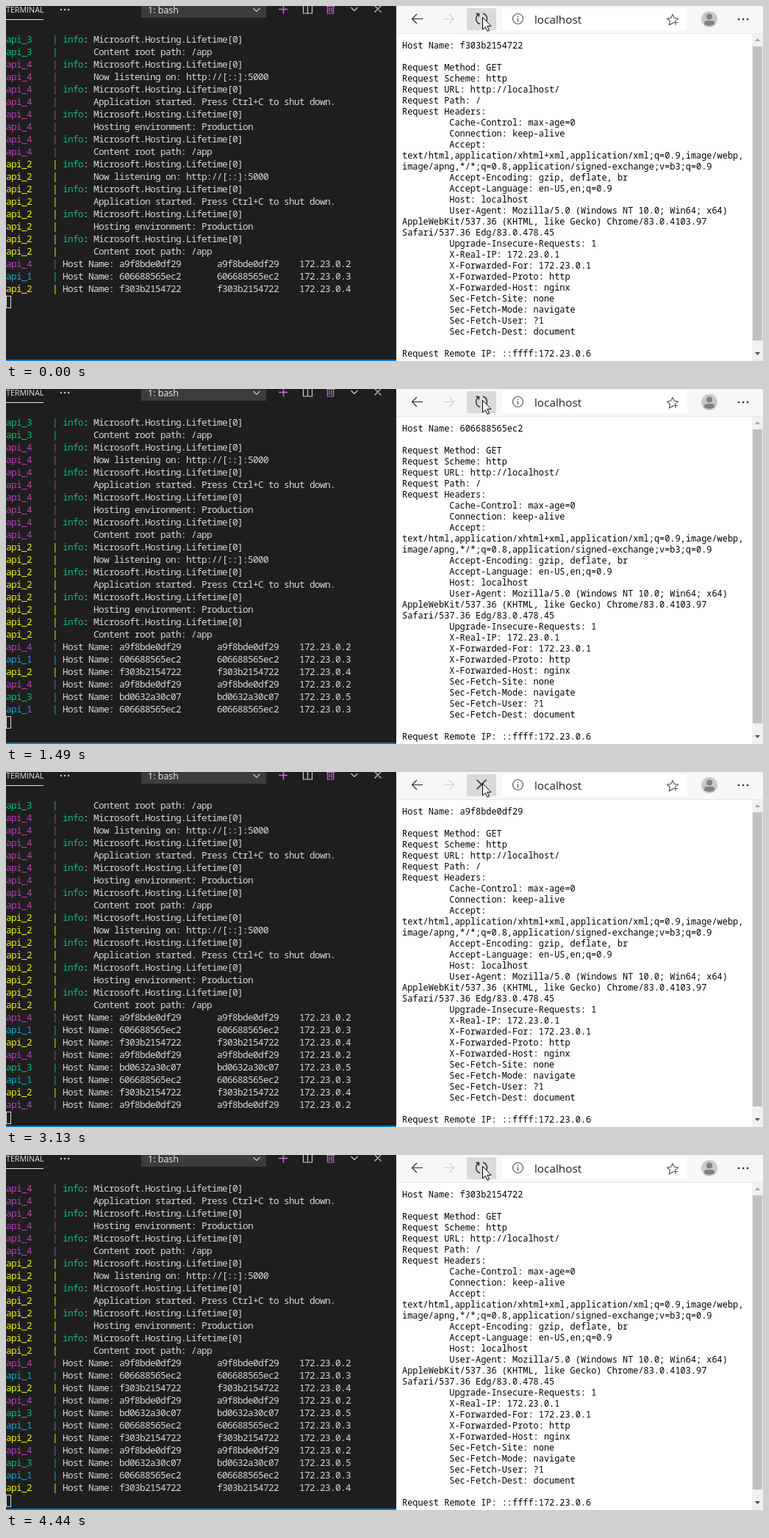
An HTML page for the animation above (4980 ms loop, 1030 by 484 pixels).

```html
<!DOCTYPE html>
<html lang="en">
<head>
<meta charset="utf-8">
<title>Load balanced requests</title>
<style>
  html, body { margin: 0; width: 100%; height: 100%; overflow: hidden; background: #1e1e1e; }
  svg { display: block; width: 1030px; height: 484px; }
  text { white-space: pre; }
  .mono { font-family: "Noto Sans Mono", "DejaVu Sans Mono", monospace; }
  .ui { font-family: "Open Sans", "Noto Sans", sans-serif; }
  .line { fill: none; stroke-width: 1.2; }
  /* terminal glyphs sit on a 7px cell grid */
  #log { font-size: 12.8px; letter-spacing: calc(7px - .6em); fill: #d8d8d8; }
  #page { font-size: 11.917px; fill: #000; }
</style>
</head>
<body>
<svg viewBox="0 0 1030 484">
  <!-- terminal -->
  <rect width="531" height="484" fill="#1e1e1e"/>
  <g id="log" class="mono"></g>
  <rect id="caret" x=".5" y="0" width="6" height="16" fill="none" stroke="#d8d8d8"/>
  <rect width="531" height="37" fill="#1e1e1e"/>
  <rect y="482" width="531" height="2" fill="#007acc"/>
  <text class="ui" x="0" y="9" font-size="10.7" fill="#e7e7e7">TERMINAL</text>
  <rect y="18" width="51" height="1" fill="#e7e7e7"/>
  <g fill="#d0d0d0">
    <circle cx="75" cy="5" r="1.2"/><circle cx="80" cy="5" r="1.2"/><circle cx="85" cy="5" r="1.2"/>
  </g>
  <rect x="184" width="170" height="16" fill="#3c3c3c"/>
  <text class="ui" x="193" y="10" font-size="12.5" fill="#f0f0f0">1: bash</text>
  <g class="line" stroke="#d0d0d0">
    <path d="M336.500 3l4.500 4.500l4.500-4.500M469.500 2l4.500 4.500l4.500-4.500M501.500-.5l9 9m0-9l-9 9"/>
    <path d="M404.500-2v12h12v-12M410.500-2v12"/>
  </g>
  <g class="line" stroke="#cf68e1">
    <path d="M371 4.500h12M377.500-2v12.500" stroke-width="1.500"/>
    <path d="M436 .5h11M437.500 1v9h8v-9M440 2v6M443 2v6"/>
  </g>

  <!-- browser -->
  <rect x="531" width="499" height="484" fill="#fff"/>
  <rect x="531" width="499" height="38" fill="#f7f7f7"/>
  <rect x="531" y="37" width="499" height="1" fill="#e6e6e6"/>
  <rect x="627" y="3" width="40" height="30" rx="2" fill="#dadada"/>
  <rect x="675" y="3" width="252" height="30" rx="3" fill="#fff"/>
  <g class="line" stroke="#2b2b2b">
    <path d="M567 17.500h-14.500m6.500-6.500l-6.500 6.500l6.500 6.500"/>
    <path d="M595 17.500h14.500m-6.500-6.500l6.500 6.500l-6.500 6.500" stroke="#d0d0d0"/>
    <g id="reload" stroke-width="1.400">
      <path d="M645 24.500A7.300 7.300 0 0 1 643 11.300M639.500 10.500h4v4"/>
      <path d="M649 10.200A7.300 7.300 0 0 1 651 23.500M654.500 24.500h-4v-4"/>
    </g>
    <path id="stop" d="M640.500 10.500l13 13m0-13l-13 13" stroke-width="1.500"/>
    <g stroke="#5a5a5a">
      <circle cx="696.500" cy="17.500" r="7"/>
      <path d="M696.500 16.500v5M696.500 13.500v1.500" stroke-width="1.400"/>
      <path d="M908 24l-1-.6l-4.600 2.400l.9-5.100l-3.700-3.600l5.100-.8l2.300-4.700l2.300 4.700l5.100.8l-2 2M911 19v7M907.500 22.500h7"/>
    </g>
  </g>
  <text class="ui" x="719" y="24" font-size="15.300" fill="#1f1f1f">localhost</text>
  <circle cx="957" cy="18" r="11" fill="#cbc9c8"/>
  <g fill="#85817f">
    <circle cx="957" cy="14.500" r="4"/>
    <path d="M950 25v-1.500q0-3.500 3.500-3.500h7q3.500 0 3.500 3.500v1.500q-7 4-14 0z"/>
  </g>
  <g fill="#2b2b2b">
    <circle cx="997" cy="18" r="1.300"/><circle cx="1003" cy="18" r="1.300"/><circle cx="1009" cy="18" r="1.300"/>
  </g>
  <g id="page" class="mono"></g>
  <rect x="1015" y="38" width="15" height="446" fill="#f1f1f1"/>
  <rect x="1016" y="55" width="13" height="401" fill="#c1c1c1"/>
  <path d="M1019 48l3.500-4l3.500 4z" fill="#a3a3a3"/>
  <path d="M1019 472l3.500 4l3.500-4z" fill="#505050"/>
  <path d="M648.500 15.500v16.500l3.800-3.600l2.700 6l2.500-1.100l-2.700-5.900h5.200z" fill="#fff" stroke="#000"/>
</svg>
<script>
const LOOP = 4980, ROW = 17, LAST_ROW = 25, FIRST_HITS = 3;

const hosts = {
  1: { id: "606688565ec2", ip: "172.23.0.3", color: "#11a8cd" },
  2: { id: "f303b2154722", ip: "172.23.0.4", color: "#f0f010" },
  3: { id: "bd0632a30c07", ip: "172.23.0.5", color: "#0dbc79" },
  4: { id: "a9f8bde0df29", ip: "172.23.0.2", color: "#bc3fbc" }
};

// late: the newline reaches the terminal only when the page loads
const hits = [
  { host: 4, click: 100, log: 200, load: 260 },
  { host: 3, click: 790, log: 890, load: 950 },
  { host: 1, click: 1390, log: 1490, load: 1490 },
  { host: 2, click: 1960, log: 2060, load: 2120 },
  { host: 4, click: 2500, log: 2600, load: 2660, late: true },
  { host: 3, click: 3130, log: 3290, load: 3360 },
  { host: 1, click: 3840, log: 3900, load: 3900 },
  { host: 2, click: 4280, log: 4380, load: 4440, late: true }
];

const messages = ["Now listening on: http://[::]:5000",
  "Application started. Press Ctrl+C to shut down.",
  "Hosting environment: Production", "Content root path: /app"];

const tab = " ".repeat(9);
const pageLines = ["Host Name: ", "", "Request Method: GET", "Request Scheme: http",
  "Request URL: http://localhost/", "Request Path: /", "Request Headers:",
  tab + "Cache-Control: max-age=0", tab + "Connection: keep-alive", tab + "Accept:",
  "text/html,application/xhtml+xml,application/xml;q=0.9,image/webp,",
  "image/apng,*/*;q=0.8,application/signed-exchange;v=b3;q=0.9",
  tab + "Accept-Encoding: gzip, deflate, br", tab + "Accept-Language: en-US,en;q=0.9",
  tab + "Host: localhost", tab + "User-Agent: Mozilla/5.0 (Windows NT 10.0; Win64; x64)",
  "AppleWebKit/537.36 (KHTML, like Gecko) Chrome/83.0.4103.97",
  "Safari/537.36 Edg/83.0.478.45", tab + "Upgrade-Insecure-Requests: 1",
  tab + "X-Real-IP: 172.23.0.1", tab + "X-Forwarded-For: 172.23.0.1",
  tab + "X-Forwarded-Proto: http", tab + "X-Forwarded-Host: nginx",
  tab + "Sec-Fetch-Site: none", tab + "Sec-Fetch-Mode: navigate",
  tab + "Sec-Fetch-User: ?1", tab + "Sec-Fetch-Dest: document", "",
  "Request Remote IP: ::ffff:172.23.0.6"];

const $ = id => document.getElementById(id);
const log = $("log"), page = $("page"), caret = $("caret");

function add(parent, name, attrs, content = "") {
  const node = document.createElementNS("http://www.w3.org/2000/svg", name);
  for (const key in attrs) node.setAttribute(key, attrs[key]);
  node.textContent = content;
  return parent.appendChild(node);
}

const logLines = [];
function addLog(host, body, level = "") {
  const line = add(log, "text", { x: 0, y: 50 + ROW * logLines.length });
  add(line, "tspan", { fill: hosts[host].color }, `api_${host}    | `);
  if (level) add(line, "tspan", { fill: "#0dbc79" }, level);
  add(line, "tspan", {}, body);
  logLines.push(line);
}

function addStartup(host, list) {
  for (const message of list) {
    addLog(host, ": Microsoft.Hosting.Lifetime[0]", "info");
    addLog(host, " ".repeat(6) + message);
  }
}

addStartup(3, messages.slice(3));
addStartup(4, messages);
addStartup(2, messages);
const startup = logLines.length;
for (const host of [4, 1, 2, ...hits.map(hit => hit.host)]) {
  const { id, ip } = hosts[host];
  addLog(host, `Host Name: ${id}       ${id}    ${ip}`);
}

const pageText = pageLines.map((line, i) => add(page, "text", { x: 539, y: 58 + 15 * i }, line));

const show = (node, on) => node.setAttribute("visibility", on ? "visible" : "hidden");

function draw(t) {
  let count = startup + FIRST_HITS, current = 2, loading = false, held = 0;
  for (const hit of hits) {
    if (t >= hit.log) count++;
    if (t >= hit.load) current = hit.host;
    if (t >= hit.click && t < hit.log) loading = true;
    if (hit.late && t >= hit.log && t < hit.load) held = 1;
  }
  const caretLine = count - held;
  const top = Math.max(0, caretLine - LAST_ROW);
  logLines.forEach((line, i) => show(line, i >= top && i < count));
  log.setAttribute("transform", `translate(0 ${-ROW * top})`);
  caret.setAttribute("y", 38.5 + ROW * (caretLine - top));
  pageText[0].textContent = pageLines[0] + hosts[current].id;
  show($("reload"), !loading);
  show($("stop"), loading);
}

function tick() {
  draw(performance.now() % LOOP);
  requestAnimationFrame(tick);
}
tick();
</script>
</body>
</html>
```
